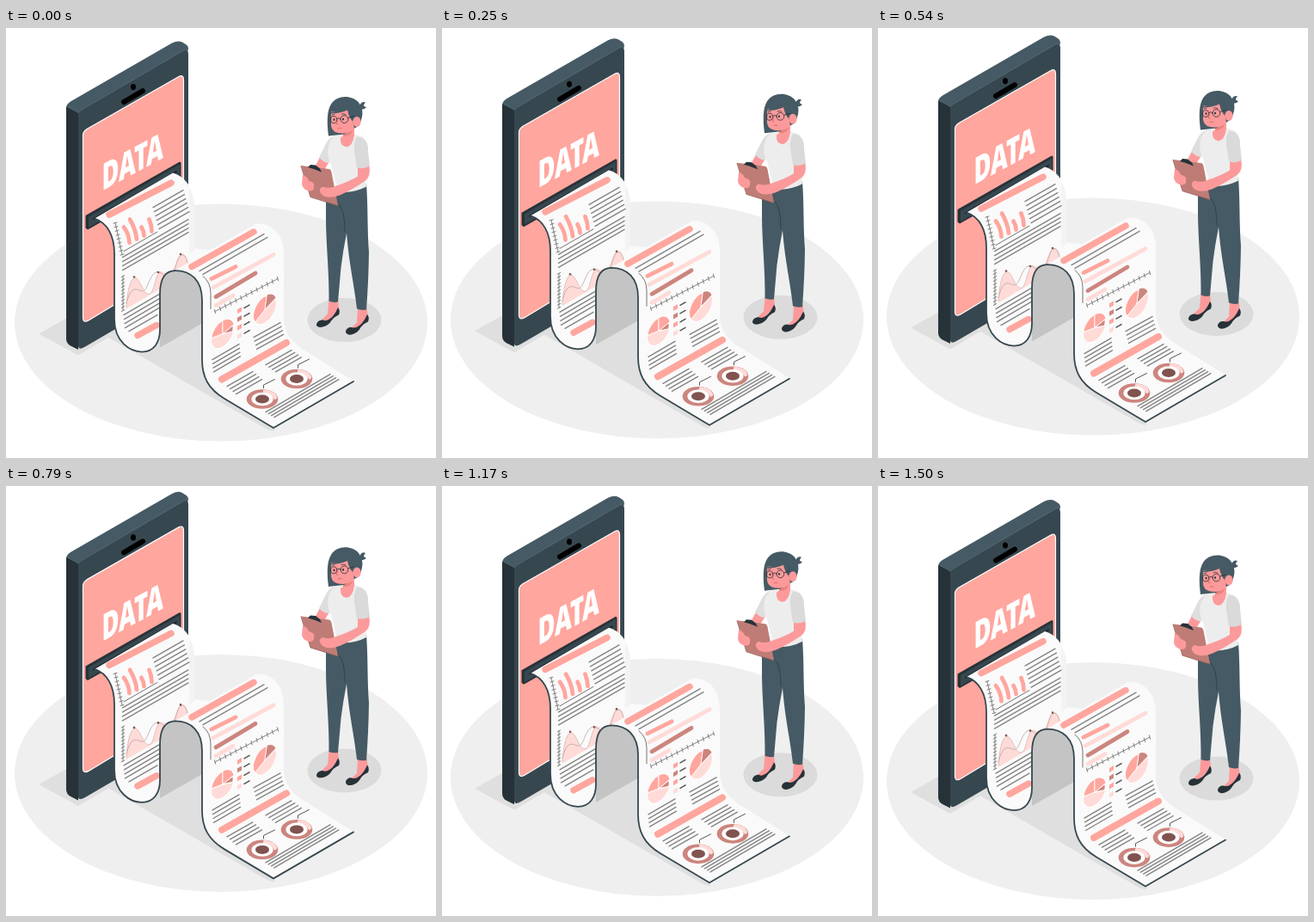
Recreate the animation shown at these times as an HTML page. Size 500 by 500 pixels, loop 1540 ms.

```html
<!DOCTYPE html>
<html lang="en">
<head>
<meta charset="utf-8">
<title>Data report</title>
<style>
html, body { margin: 0; width: 100%; height: 100%; overflow: hidden; background: #fff; }
svg { display: block; width: 100%; height: 100%; }
text { font: 800 43px "Open Sans", sans-serif; fill: #fff; }
path { fill: none; stroke-linecap: round; stroke-linejoin: round; }
</style>
</head>
<body>
<svg viewBox="0 0 500 500"><g id="scene"></g></svg>
<script>
const PINK = '#ffa69e', PALE = '#ffdbd8', ROSE = '#cc857e', BROWN = '#80534f', SKIN = '#fc9a9b';
const SLATE = '#455a64', STEEL = '#37474f', DARK = '#263238', PAPER = '#fafafa';

const fill = (color, d) => `<path d="${d}" style="fill:${color}"/>`;
const stroke = (color, width, d) => `<path d="${d}" stroke="${color}" stroke-width="${width}"/>`;
const oval = (color, x, y, rx, ry = rx) => `<ellipse cx="${x}" cy="${y}" rx="${rx}" ry="${ry}" fill="${color}"/>`;
const bar = (color, width, x1, y1, x2, y2) => stroke(color, width, `M${x1},${y1}L${x2},${y2}`);

// Rows of body text: the first row runs x,y -> x2,y2, each next one is shifted by sx,sy.
function rows(count, x, y, x2, y2, sx, sy) {
  let d = '';
  for (let i = 0; i < count; i++) d += `M${x + i * sx},${y + i * sy}L${x2 + i * sx},${y2 + i * sy}`;
  return stroke('#858585', 1.4, d);
}

function ticks(count, x, y, dx, dy, tx, ty) {
  let d = `M${x},${y}l${dx},${dy}`;
  for (let i = 0; i <= count; i++) {
    d += `M${x + dx * i / count - tx},${y + dy * i / count - ty}l${2 * tx},${2 * ty}`;
  }
  return stroke('#666', 0.8, d);
}

function slice(color, from, to, r = 15.5) {
  const point = a => `${r * Math.cos(a)},${r * Math.sin(a)}`;
  return `<path stroke="#fff" style="fill:${color}"
    d="M0,0L${point(from)}A${r},${r} 0 ${to - from > Math.PI ? 1 : 0} 1 ${point(to)}Z"/>`;
}
const pie = (x, y, slices) => `<g transform="matrix(.866 -.5 0 1 ${x} ${y})">${slices}</g>`;

const donut = (x, y) =>
  oval(ROSE, x, y, 18.3, 11.3) +
  stroke(PALE, 4.5, `M${x + 3},${y - 8.8}A15.5,9 0 0 1 ${x + 15},${y - 2}`) +
  oval('#fff', x, y, 12.6, 7.8) + oval(BROWN, x, y, 8, 5) +
  stroke('#555', 1, `M${x + 1.5},${y - 13}v-3.5l13,-6.5`);

const floor =
  oval('#efefef', 250, 342, 240, 138) +
  fill('#dfdfdf', 'M38,355L72,336L135,350L84,380Z') +
  fill('#dfdfdf', 'M115,357L150,330L229,335L236,408L312,459V468Q306,468 300,464Z') +
  oval('#dbdbdb', 393.5, 339, 43, 25.5);

const phone =
  fill(SLATE, 'M70,93Q70,88 75,85L193,17Q200,13.5 205,16L209,18.5Q212,20 212,24L200,60L84,110Z') +
  fill(DARK, 'M70,91L84,98V373.5L75,369Q70,366 70,361Z') +
  fill(STEEL, 'M84,101Q84,97 88,95L205,27Q212,22 212,30V295Q212,300 207,303L93,369.5Q84,375 84,369Z') +
  stroke('#62757e', 0.5, 'M70.5,90L84,98Q85,96 89,94L205,26Q209,24 211.5,23') +
  oval('#000', 148, 68, 3, 3.6) + bar('#000', 6, 137, 85.5, 159, 72.5) +
  `<path d="M89.5,124Q89.5,120 94,117L201,56Q206.5,53 206.5,60V266Q206.5,272 201,276L96,339.5Q89.5,343 89.5,336Z"
    style="fill:${PINK}" stroke="#fff" stroke-width="1.2"/>` +
  '<text transform="matrix(.635 -.343 0 1 111.5 189)">DATA</text>' +
  fill(DARK, 'M92.5,217.5L202,155L203.5,156V172.5L95,234L92.5,232Z') +
  fill(STEEL, 'M96,219L202,158V171L96,231.5Z') +
  bar('#1b262b', 2, 102, 221.5, 198, 166.5);

const edge1 = 'M103,221C118,226 126,241 126,262V338C126,365 145,376 158,376C172,376 179,365 179,350V309C179,291 185,281.5 197,281.5';
const edge2 = 'M197,281.5C215,281.5 228,293 228,316V385C228,405 235,419 254,430.5L311,464.5';

const charts1 =
  bar(PINK, 7.5, 120, 216.5, 192, 179.5) +
  ticks(8, 127, 226, 8, 37, 2, -0.6) +
  stroke(PINK, 4.8, 'M137,231Q143,239 143.5,249') +
  stroke(PINK, 4.8, 'M144,222Q151,234 152,245') +
  stroke(PINK, 4.8, 'M157.5,231Q160.5,236 160.5,241') +
  stroke(PINK, 4.8, 'M166.5,222Q169.5,229 169.5,236') +
  bar('#666', 0.9, 137, 259, 176, 236.5) +
  rows(6, 171, 208, 206, 188, 1.4, 5) +
  rows(4, 135.5, 266, 212, 222, 0, 5) +
  ticks(10, 136, 288, 0, 40, 1.8, -1) +
  fill(PALE, 'M140,326C141,305 145,290 150,290C156,290 159,309 166,309C173,309 173,284 180,283C187,282 187,288 192,284C197,279 198,262 205,262Q210,262 212,275V283L179,303Z') +
  stroke('#b5a5a3', 0.8, 'M140,320C145,299 151,303 157,305C164,308 165,292 172,285C180,278 182,291 190,287C199,283 198,264 205,263Q209,263 211,272') +
  stroke('#d9b5b0', 0.8, 'M140,324C141,305 145,290 150,290C156,290 159,309 166,309C173,309 173,284 180,283') +
  oval(BROWN, 149, 289, 1.3) + oval(BROWN, 177, 283.5, 1.3) + oval(BROWN, 203, 262.5, 1.3) +
  rows(4, 137, 333, 178, 309, 0.5, 5) + rows(1, 143, 352, 176, 333, 0, 0) +
  bar(PINK, 7.5, 153, 357, 175, 345);

const charts2 =
  bar(PINK, 7.5, 216, 277, 288, 236.5) +
  rows(2, 225, 282, 300, 239, 4, 3.8) +
  stroke('#666', 0.9, 'M229,288Q238,295 238,308V326') +
  bar(PINK, 4.8, 239, 291, 267, 277) + bar(PALE, 4.8, 241, 301, 311, 263) +
  bar(ROSE, 4.8, 244, 312, 290, 284.5) + bar(PALE, 4.8, 244, 322, 264, 310.5) +
  ticks(12, 243, 329, 73, -38, 0.6, 2.2) +
  pie(252, 355, slice(PALE, 0.3, 3.3) + slice(PINK, 3.3, 4.71) + slice(PINK, 4.71, 6.08) + slice(ROSE, -0.2, 0.3, 14)) +
  pie(301, 327, slice(PALE, -0.4, 2.6) + slice(PINK, 2.6, 4.88) + slice(ROSE, -1.4, -0.4, 16.5)) +
  [328, 337.5, 347.5, 357.5].map((y, i) =>
    fill([PINK, ROSE, PINK, PALE][i], `M269,${y - 1.2}l5,-2.8v5l-5,2.8z`) +
    bar('#555', 1.5, 277, y - 3, 283, y - 6.5)).join('') +
  rows(4, 240, 385, 271, 367, 0.5, 4.8) + rows(4, 288, 359, 319, 342, 1.2, 4.6) +
  bar(PINK, 8, 251, 408, 326, 365.5) +
  rows(4, 257, 416, 287, 399, 3.5, 3) + rows(4, 302, 391, 332, 374, 3.8, 2.8) +
  donut(298, 431) + donut(338, 407.5) +
  rows(4, 302, 446, 377, 402, 3.3, 2);

const papers =
  fill(PAPER, edge1 + 'L238,258L219,256V206C219,188 210,173 194,168Z') +
  fill('#f3f3f3', 'M213,186Q219,195 219,206V258L213,262Z') +
  charts1 +
  fill('#c4c4c4', 'M179,371V309C179,291 185,281.5 197,281.5C215,281.5 228,293 228,316V343Z') +
  stroke(STEEL, 1.8, edge1) +
  fill(PAPER, edge2 + 'L404,410L345,373C330,363 323,352 323,335V262C323,239 309,226 291,227L197,281Z') +
  charts2 +
  stroke(STEEL, 1.8, edge2 + 'L404,410.5');

const legs =
  fill(SKIN, 'M375.5,315H386L387,326L374,341L364,342L374,332Z') +
  fill(SKIN, 'M409,324H419.5L421,336L409,352L398,352L408,342Z') +
  fill(DARK, 'M361,345C361,341 365,339 368,339Q372,341 376,338C381,335 384,329 386,324.5Q389,328 387,333Q380,336 377,342C372,348 362,349 361,345Z') +
  fill(DARK, 'M395,353C395,349 399,347 402,347.5Q407,349 410,346C415,343 418,337 420,332.5Q423,336 421,341Q414,344 411,350C406,357 396,358 395,353Z') +
  fill(SLATE, 'M372,195L419,181C421,205 420,235 422,260Q421.5,295 419,327Q413,328 408,326C405,298 399,275 396,238Q392,258 389.5,278L386,318Q380,319 375.5,317C376,285 372,250 372,220Z') +
  stroke(DARK, 0.6, 'M387,205Q394,210 394,236');

const torso =
  fill(SKIN, 'M367,146L377,153L368,168L355,169Z') +
  fill('#dedede', 'M384,124Q375,126 370,138L364,150Q370,157 376,156Z') +
  fill('#ededed', 'M384,124C394,122 404,121 414,126C423,132 422,150 417,162L419,184Q404,192 386,190L378,158C372,147 373,130 384,124Z') +
  fill(SKIN, 'M392,115L405,116L405,124Q403,137 396,138Q388,137 389,127L392,125Z') +
  fill('#e9827c', 'M392,121Q399,120 404,116Q402,126 392,125Z') +
  fill('#bf7c76', 'M343,159.5L376,163.5Q378,164 378.5,167L386,206L354,196Z') +
  stroke('#96605a', 0.8, 'M343,160L354,196L385.5,206') +
  fill(DARK, 'M351,161.5L354,158.5L360,159L365,163L367,167L358,163.5Z') +
  fill(SKIN, 'M345,170Q351,173 352,177Q360,179 358,184Q359,189 352,189Q345,187 344,181Z') +
  fill(SKIN, 'M409,160L422,158Q425,172 418,177Q402,188 388,194Q374,199 367,193Q362,187 368,184Q376,187 384,183Q399,178 409,172Z') +
  fill('#dadada', 'M408,126C417,125 422,134 421,143L423,160Q416,164 408,162C406,147 402,135 408,126Z');

const head =
  fill(SLATE, 'M412,88Q414,84 418,86Q416,88 416,90L419,92Q415,95 412,94Z') +
  fill(SLATE, 'M375,125C373,110 373,96 378,88C385,77 402,77 410,86C417,94 415,106 409,114L393,123Z') +
  fill(SKIN, 'M378,97Q390,97 397,93Q399,99 403,105L405,117Q399,122 391,122Q380,122 378,114Z') +
  oval(SKIN, 408, 108.5, 4.6, 6) +
  fill(SLATE, 'M375,98Q386,97 397,91L403,91Q404,99 403,108Q399,104 397,95Q388,99 377,99Q378,113 379,124H375Z') +
  stroke(DARK, 0.8, 'M377.5,106a3.6,4 0 1 0 7.2,0a3.6,4 0 1 0 -7.2,0M389,105.5a4.4,4.4 0 1 0 8.8,0a4.4,4.4 0 1 0 -8.8,0M384.7,105Q387,103 389,105M397.8,104L404,102') +
  oval(DARK, 381.5, 106, 1, 1.4) + oval(DARK, 392, 105.5, 1, 1.4) +
  stroke(DARK, 0.7, 'M379,100.5l3,-0.7M390,99.5q3,-1 5,0.5') +
  stroke('#d9605c', 0.8, 'M386,106l-2,5l2,0.5M386,116q2,-1 4,0');

const scene = document.getElementById('scene');
scene.innerHTML = floor + phone + papers + legs + torso + head;

// Constant-speed bob: ten units up and back down.
const PERIOD = 1540, RISE = 10;
function frame(now) {
  const phase = ((now + 40) % PERIOD) / PERIOD;
  const height = RISE * (1 - Math.abs(1 - 2 * phase));
  scene.setAttribute('transform', `translate(0 ${1.1 - height})`);
  requestAnimationFrame(frame);
}
frame(performance.now());
</script>
</body>
</html>
```
